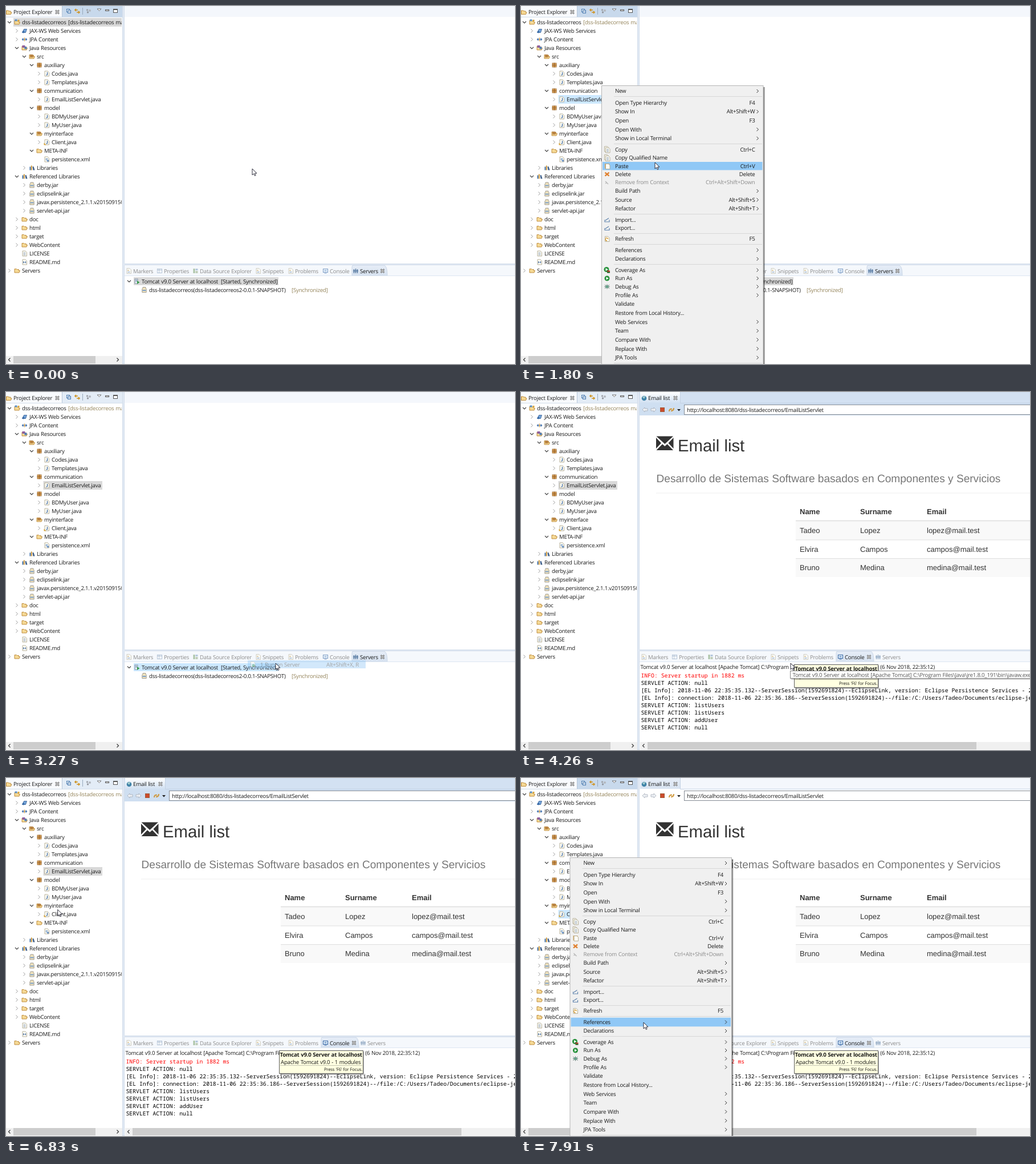
An HTML page for the animation above (7.99 s loop, 893x627 px).

```html
<!DOCTYPE html>
<html lang="en">
<head>
<meta charset="utf-8">
<title>Servlet demo</title>
<style>
html,body{margin:0;width:100%;height:100%;overflow:hidden;background:#fff}
svg{display:block;width:100vw;height:100vh}
text{font:9.7px "Open Sans","Noto Sans",sans-serif;letter-spacing:-.026em;word-spacing:.05em;fill:#1b1b1b;white-space:pre;text-rendering:geometricPrecision}
.b{font-weight:700}
.tan{fill:#94845a}
.dim{fill:#8c8c8c}
.tip{fill:#575757}
.tiny{font-size:7.7px}
.mono{font:9.77px "Noto Sans Mono","DejaVu Sans Mono",monospace;letter-spacing:0;word-spacing:0;fill:#000}
.err{fill:#f00}
.web{font:13px "Liberation Sans",Arial,sans-serif;letter-spacing:0;word-spacing:0;fill:#333}
.th{font-weight:700}
.h{font-size:29.3px}
.lead{font-size:19.1px;fill:#777}
.end{text-anchor:end}
</style>
</head>
<body>
<svg id="stage" viewBox="0 0 893 627" preserveAspectRatio="none"></svg>
<script>
const LOOP = 7990;
const rect = (x, y, w, h, fill, extra = '') => `<rect x="${x}" y="${y}" width="${w}" height="${h}" fill="${fill}" ${extra}/>`;
const line = (d, color, w = 1) => `<path d="${d}" fill="none" stroke="${color}" stroke-width="${w}"/>`;
const shape = (d, fill, extra = '') => `<path d="${d}" fill="${fill}" ${extra}/>`;
const dot = (x, y, r, fill) => `<circle cx="${x}" cy="${y}" r="${r}" fill="${fill}"/>`;
const text = (x, y, s, cls = '') => `<text x="${x}" y="${y}" class="${cls}">${s}</text>`;
const group = (id, body) => `<g id="${id}">${body}</g>`;
const at = (x, y, body) => `<g transform="translate(${x} ${y})">${body}</g>`;
const box = (x, y, w, h, fill, stroke) => rect(x + .5, y + .5, w - 1, h - 1, fill, `stroke="${stroke}"`);
const fade = (id, top, bottom) => `<linearGradient id="${id}" x2="0" y2="1"><stop stop-color="${top}"/><stop offset="1" stop-color="${bottom}"/></linearGradient>`;
const shadow = (x, y, w, h) => rect(x, y, w, h, '#000', 'opacity=".22"') + rect(x, y, w - 1, h - 1, '#000', 'opacity=".35"');
const cross = (x, y) => at(x, y, line('M-3-3 3 3M3-3-3 3', '#6f6f6f', 2.6) + line('M-2.6-2.6 2.6 2.6M2.6-2.6-2.6 2.6', '#fff', 1));
const right = (x, y, color = '#9a9a9a') => line(`M${x - 1.5} ${y - 3}l3 3-3 3`, color);
const down = (x, y) => line(`M${x - 3} ${y - 1.5}l3 3 3-3`, '#404040', 1.1);

// Small icons, drawn around their centre
const page = shape('M-3.5-4.5H1.5L4-2V4.5H-3.5Z', '#fdfdf6', 'stroke="#a89f85" stroke-width=".8"');
const folder = shape('M-4.5 3.5V-3H-1L0-2H3V0H5L3.5 3.5Z', '#f5d995', 'stroke="#b98432" stroke-width=".9"');
const blocks = rect(-3.5, -3.5, 7, 7, '#d9a25a', 'stroke="#9a6427" stroke-width=".8"') + line('M-4 0H4M0-4V4', '#8a5520', .9);
const books = rect(-4, -2, 2, 6, '#3f6fa8') + rect(-1.7, -4, 2, 8, '#d09a3d') + shape('M1-2 3-2.5 5 4H2Z', '#3f5f88');
const jay = line('M1-2.5V1.2Q1 2.6-1 2.4', '#35609c', 1.2);
const icons = {
  project: folder + rect(-4, -5, 4, 3, '#5b8fc7') + rect(1, -4.5, 3, 3, '#d8a53c'),
  service: shape('M-4 3L-1-3H4L2 3Z', '#76a5da', 'stroke="#2b568f" stroke-width=".8"') + dot(-2, 2, 2, '#3a6ca8'),
  jpa: line('M-4 0H4M-2-2-4 0-2 2M2-2 4 0 2 2', '#3d6fae', 1.2) + rect(-.7, -3, 1.4, 6, '#d39a3c'),
  res: folder + rect(-4, -4.5, 5, 4, '#8f5fa0') + rect(0, -2, 4, 4, '#4f7fb9'),
  src: folder + at(-.5, -1, `<g transform="scale(.65)">${blocks}</g>`),
  pack: blocks,
  java: page + jay,
  run: page + jay + shape('M-5 1V5H-1Z', '#d8a53c'),
  folder: folder,
  xml: page + line('M-2-1H2M-2 1H1', '#5883b5') + dot(2, 2.5, 1.8, '#6b94c7'),
  books: books,
  jar: shape('M-2.5-4.5H2.5V-3L3.7-1.5V4.5H-3.7V-1.5L-2.5-3Z', '#f1e3bd', 'stroke="#8d8a80" stroke-width=".8"') + rect(-3, 0, 6, 2, '#7ba0ca'),
  file: page + line('M-2-1.5H2M-2 .5H2M-2 2.5H2', '#7e93ad', .8),
  md: page + line('M-2 2V-1L0 1 2-1V2', '#44699b', 1),
  server: rect(-4, -4, 5, 8, '#eef2f7', 'stroke="#6d7f96" stroke-width=".8"') + line('M-3-2H0M-3 0H0', '#55769d', .9) + shape('M0-1 4.5 2 0 5Z', '#379a4a'),
  servers: line('M-3-3V4M0-4V4M3-3V4M-4.5 0H4.5', '#5578a0', 1.5),
  console: rect(-4, -3.5, 8, 6, '#eaf2fb', 'stroke="#3c6ca8" stroke-width="1.1"') + rect(-2, -1.5, 4, 2, '#6d9acb') + line('M-2 4H2', '#3c6ca8'),
  table: rect(-4, -3.5, 8, 7, '#fff', 'stroke="#6f8db0" stroke-width=".8"') + line('M-4-1.5H4M-1-3.5V3.5', '#6f8db0', .8),
  marks: page + rect(-2, -2, 2, 2, '#c69a4d') + rect(-2, 1, 4, 2, '#8fa8c7'),
  data: rect(-4, -4, 3, 8, '#7aa26f') + rect(0, -4, 4, 3, '#89a7c7') + rect(0, 0, 4, 4, '#9cb18c')
};
const icon = (kind, x, y) => at(x, y, icons[kind]);

// depth, state (v open, > closed, - leaf), icon, label
const tree = `0 v project dss-listadecorreos
1 > service JAX-WS Web Services
1 > jpa JPA Content
1 v res Java Resources
2 v src src
3 v pack auxiliary
4 > java Codes.java
4 > java Templates.java
3 v pack communication
4 > java EmailListServlet.java
3 v pack model
4 > java BDMyUser.java
4 > java MyUser.java
3 v src myinterface
4 > run Client.java
3 v folder META-INF
4 - xml persistence.xml
2 > books Libraries
1 v books Referenced Libraries
2 > jar derby.jar
2 > jar eclipselink.jar
2 > jar javax.persistence_2.1.1.v201509150
2 > jar servlet-api.jar
1 > folder doc
1 > folder html
1 > folder target
1 > folder WebContent
1 - file LICENSE
1 - md README.md
0 > folder Servers`.split('\n').map((row, i) => {
  const [, depth, state, kind, label] = row.match(/(\d) (\S) (\S+) (.*)/);
  const x = 28 + 13 * depth, y = 28.5 + 15 * i;
  const twisty = state === 'v' ? down(x - 22, y) : state === '>' ? right(x - 22, y) : '';
  return twisty + icon(kind, x - 8.5, y) + text(x, y + 3.5, label);
}).join('');

const scroll = (x, end, thumbEnd) => rect(x, 613, end - x, 13, '#f0f0f0') + rect(x + 13, 613, thumbEnd - x - 13, 13, '#cdcdcd')
  + line(`M${x + 7.5} 616.5l-3 3 3 3`, '#404040', 1.3) + line(`M${end - 9.5} 616.5l3 3-3 3`, '#404040', 1.3);

const explorer = rect(0, 0, 204, 627, '#fff')
  + group('strip', rect(98, 0, 106, 19, '#c8d9ec')) + rect(0, 0, 98, 19, '#f8fafd') + line('M98.5 0V19', '#b7c6d9')
  + line('M0 19.5H204', '#d3deeb') + icon('folder', 5, 11) + text(13, 14, 'Project Explorer') + cross(90, 10.5)
  + box(106, 5, 6, 6, '#fff', '#4779b0') + box(108, 7, 6, 6, '#fff', '#4779b0') + line('M109 10H113', '#4779b0')
  + line('M121 7H126M123 5 121 7 123 9M129 11H124M127 9 129 11 127 13', '#cf9424', 1.7)
  + line('M134.5 3V15', '#98a9bd') + dot(142.5, 7, 1.7, '#a2a6ad') + dot(147, 8, 2, '#b3b7be') + dot(143.5, 11, 1.7, '#9599a1')
  + shape('M160 5H167L163.5 8.5Z', '#fff', 'stroke="#555" stroke-width=".8"')
  + box(174, 6, 7, 3, '#fff', '#555') + box(188, 5, 8, 7, '#fff', '#555') + line('M188 6.5H196', '#555')
  + '<rect id="sel"/>' + tree
  + group('tagDark', text(109, 32, '[dss-listadecorreos master]')) + group('tagTan', text(109, 32, '[dss-listadecorreos master]', 'tan'))
  + rect(203, 20, 1, 593, '#fff') + scroll(0, 204, 157);

const frame = rect(204, 0, 689, 627, '#e1e9f4') + line('M204.5 0V627', '#d3ddea')
  + rect(208, 0, 685, 451, '#fff') + rect(208, 0, 685, 19, '#f4f7fc')
  + rect(208, 454, 685, 173, '#fff') + rect(208, 454, 685, 18, '#f5f8fc') + line('M207.5 0V451M208 451.5H893M207.5 454V627M208 453.5H893', '#d3ddea');

const browserTab = group('webOn', rect(208, 0, 685, 19, '#d3e1f2') + rect(208, 19, 685, 22, '#cfdff1') + rect(209, 0, 70, 20, 'url(#tabOn)'))
  + group('webOff', rect(208, 0, 685, 19, '#f4f7fc') + rect(208, 19, 685, 22, '#fff') + rect(209, 0, 70, 19, 'url(#tabOff)'))
  + line('M279.5 0V19.5H893', '#c3d1e3') + dot(216, 11, 4.3, '#3f83a8') + shape('M213 9Q216 6 218 8L216 12Z', '#a7d0cf')
  + text(223, 14, 'Email list') + cross(271, 10.5)
  + shape('M213 31l4-4v2h5v4h-5v2Z', '#edf0f4', 'stroke="#a5adb8" stroke-width=".8"')
  + shape('M237 31l-4-4v2h-5v4h5v2Z', '#edf0f4', 'stroke="#a5adb8" stroke-width=".8"')
  + rect(244.5, 27.5, 7, 7, '#cc4b2c', 'stroke="#a05c37"')
  + line('M260 34Q260 29 265 30M268 28Q268 33 263 33', '#cf9638', 2) + shape('M274 30H280L277 33.5Z', '#222')
  + rect(286.5, 22.5, 610, 17, '#fff', 'stroke="#858b94"')
  + text(291, 34.5, 'http://localhost:8080/dss-listadecorreos/EmailListServlet') + rect(208, 41, 685, 410, '#fff');

const people = [['Tadeo', 'Lopez'], ['Elvira', 'Campos'], ['Bruno', 'Medina']];
const cells = (y, row, cls) => [489, 595, 712].map((x, i) => text(x, y, row[i], cls)).join('');
const webPage = shape('M237.5 77.5H267L252.3 91Z', '#333') + shape('M237 80 246 89.5 237 99ZM267.5 80V99L258.5 89.5ZM248 91.3 252.3 95 256.6 91.3 267 102H237.5Z', '#333')
  + text(275, 103.6, 'Email list', 'web h') + text(237.5, 158, 'Desarrollo de Sistemas Software basados en Componentes y Servicios', 'web lead')
  + line('M237 177H893', '#eee') + cells(213.7, ['Name', 'Surname', 'Email'], 'web th')
  + people.map(([name, last], i) => {
    const y = 226 + 32.7 * i;
    return rect(482, y, 411, 32.7, i % 2 ? '#fff' : '#f9f9f9') + line(`M482 ${y + (i ? .3 : -.5)}H893`, '#ddd', i ? 1 : 1.7)
      + cells(247 + 32.6 * i, [name, last, last.toLowerCase() + '@mail.test'], 'web');
  }).join('');

const tabList = [['marks', 'Markers', 223], ['table', 'Properties', 277], ['data', 'Data Source Explorer', 340], ['marks', 'Snippets', 450],
  ['marks', 'Problems', 507], ['console', 'Console', 568], ['servers', 'Servers', 621]];
const tabs = (active, x0, x1) => shape(`M${x0} 472V457Q${x0} 454 ${x0 + 3} 454H${x1 - 6}Q${x1} 455 ${x1} 472Z`, 'url(#tabOff)', 'stroke="#ccd8e8"')
  + line('M208 472.5H893', '#dce6f2')
  + tabList.map(([kind, label, x]) => {
    const shift = active === 'Console' && label === 'Servers' ? 13 : 0, on = label === active;
    return `<g opacity="${on ? 1 : .6}">${icon(kind, x - 7.5 + shift, 464)}</g>` + text(x + shift, 467.7, label, on ? '' : 'dim');
  }).join('') + cross(x1 - 8.5, 464);

const title = 'Tomcat v9.0 Server at localhost';
const proc = title + ' [Apache Tomcat] C:\\Program Files\\Java\\jre1.8.0_191\\bin\\javaw.exe (6 Nov 2018, 22:35:12)';
const servers = tabs('Servers', 607, 669) + '<rect id="row" x="224" y="475" width="254" height="14"/>'
  + down(216, 482) + icon('server', 230, 482) + text(238, 485.5, title) + text(377, 485.5, '[Started, Synchronized]')
  + icon('jar', 242.5, 497) + text(251, 500.5, 'dss-listadecorreos(dss-listadecorreos2-0.0.1-SNAPSHOT)') + text(501, 500.5, '[Synchronized]', 'tan');
const log = ['INFO: Server startup in 1882 ms', 'SERVLET ACTION: null',
  '[EL Info]: 2018-11-06 22:35:35.132--ServerSession(1592691824)--EclipseLink, version: Eclipse Persistence Services - 2.6.1',
  '[EL Info]: connection: 2018-11-06 22:35:36.186--ServerSession(1592691824)--/file:/C:/Users/Tadeo/Documents/eclipse-jee',
  'SERVLET ACTION: listUsers', 'SERVLET ACTION: listUsers', 'SERVLET ACTION: addUser', 'SERVLET ACTION: null'];
const consoleView = tabs('Console', 553, 619) + text(209.5, 485, proc)
  + log.map((s, i) => text(210.5, 499.5 + 13 * i, s, i ? 'mono' : 'mono err')).join('')
  + scroll(209, 907, 799);

const hint = rect(481, 479, 147, 41, '#000', 'opacity=".3"') + box(479, 477, 148, 41, '#ffffe1', '#5e5e5e')
  + text(480.5, 488, title, 'b') + text(482, 501.2, 'Apache Tomcat v9.0 - 1 modules')
  + line('M481 503.5H625', '#c6c6b4') + text(625, 512.5, "Press 'F6' for Focus.", 'tiny end');
const pathTip = rect(474, 490, 425, 14, '#000', 'opacity=".2"') + box(472, 488, 430, 14, '#fff', '#888') + text(476.5, 498.5, proc, 'tip');

// centre y, label, shortcut; a trailing > opens a submenu
const items = [[149, 'New>'], [169.3, 'Open Type Hierarchy', 'F4'], [185, 'Show In>', 'Alt+Shift+W'], [200.5, 'Open', 'F3'],
  [216.2, 'Open With>'], [231.8, 'Show in Local Terminal>'], [251.5, 'Copy', 'Ctrl+C'], [266, 'Copy Qualified Name'],
  [280.2, 'Paste', 'Ctrl+V'], [294.6, 'Delete', 'Delete'], [309, 'Remove from Context', 'Ctrl+Alt+Shift+Down'],
  [324, 'Build Path>'], [339.5, 'Source>', 'Alt+Shift+S'], [355, 'Refactor>', 'Alt+Shift+T'], [374.5, 'Import...'],
  [389, 'Export...'], [408, 'Refresh', 'F5'], [427.5, 'References>'], [443, 'Declarations>'], [462.5, 'Coverage As>'],
  [477, 'Run As>'], [491.5, 'Debug As>'], [506.5, 'Profile As>'], [522, 'Validate'], [537.6, 'Restore from Local History...'],
  [553.2, 'Web Services>'], [568.9, 'Team>'], [584.5, 'Compare With>'], [600.2, 'Replace With>'], [615.8, 'JPA Tools>']];
const glyph = (y, body) => at(10, y, body);
const play = dot(0, 0, 4.5, '#27913b') + shape('M-1.5-2.5 2.8 0-1.5 2.5Z', '#fff');
const arrowTray = line('M-4 0V3.5H4V0M-3 1 3-3', '#5f83ad', 1.2);
const menuIcons = glyph(251.5, at(-1, -1, page) + at(1, 1, icons.file)) + glyph(266, at(-1, -1, page) + at(1, 1, icons.file))
  + glyph(280, rect(-4, -4, 8, 8.5, '#d4a862') + at(1, 1, page)) + glyph(294.6, line('M-3.5-3 3.5 3M3.5-3-3.5 3', '#e0812f', 2.4))
  + glyph(309, line('M-3-2 2 3M-3 2 0 0', '#b9b9b9', 1.5)) + glyph(374.5, arrowTray) + glyph(389, arrowTray)
  + glyph(408, page + line('M-3-1Q0-3 2 0M0 3Q-3 3-3 0', '#d49a35', 1.4))
  + glyph(462.5, at(-1, -1, play) + rect(0, 1, 5, 2, '#c22') + rect(0, 3, 5, 2, '#151')) + glyph(477, play)
  + glyph(491.5, line('M-4-3 4 3M4-3-4 3M-4.5 0H4.5M0-4V4', '#49635c', .9) + dot(0, 0, 2.5, '#67a18b'));
const menu = shadow(3, 142, 284, 490) + box(0, 139, 284.5, 495, '#f0f0f0', '#b5b5b5')
  + '<rect id="hot" x="2" width="280.5" fill="#90c8f6"/>'
  + [158.5, 241.5, 364.5, 398.5, 417.5, 452.5, 625.5].map(y => line(`M22 ${y}H282`, '#d7d7d7')).join('')
  + items.map(([y, label, key = '']) => {
    const cls = y === 309 ? 'dim' : '';
    return text(24, y + 3.4, label.replace('>', ''), cls) + text(269.5, y + 3.4, key, 'end ' + cls) + (label.endsWith('>') ? right(274, y, '#333') : '');
  }).join('') + menuIcons;

const runItem = rect(424, 470, 207, 14, '#90c8f6', 'id="runHot"') + at(433, 477, page + dot(1, 2, 2.4, '#3c9a4b'))
  + text(446, 480.5, '1 Run on Server') + text(619, 480.5, 'Alt+Shift+X, R', 'end');
const subMenu = shadow(425, 471, 211, 39) + box(422, 468, 211, 39, '#f0f0f0', '#b5b5b5')
  + line('M444 488.5H631', '#d7d7d7') + text(446, 500.5, 'Run Configurations...');

const stage = document.getElementById('stage');
stage.innerHTML = `<defs>${fade('tabOn', '#fff', '#cfdff1')}${fade('tabOff', '#e6edf7', '#d8e3f1')}</defs>`
  + explorer + frame + group('web', browserTab) + group('page', webPage)
  + group('servers', servers) + group('console', consoleView) + group('hint', hint) + group('pathTip', pathTip)
  + group('menu', menu) + group('sub', subMenu) + group('runItem', runItem)
  + group('pointer', '<circle id="press" r="10" fill="#ff0" opacity=".47"/>'
    + shape('M0 0V11L2.6 8.7 4.4 12.4 6.1 11.6 4.4 8H8Z', '#fff', 'stroke="#1a1a2a" stroke-width=".9" stroke-linejoin="round"'));

const el = {};
stage.querySelectorAll('[id]').forEach(n => el[n.id] = n);
const show = (id, on) => { el[id].style.display = on ? '' : 'none'; };
const set = (node, attrs) => { for (const k in attrs) node.setAttribute(k, attrs[k]); };

// Pointer moves: first step, last step, destination
const moves = [[560, 1340, 141, 160], [1650, 1800, 235, 274], [1880, 2260, 262, 478], [2490, 3110, 473, 475],
  [4430, 4730, 331, 118], [5740, 5740, 330, 124], [6120, 6900, 85, 233],
  [7140, 7450, 155, 265], [7530, 7760, 190, 373], [7840, 7910, 215, 428]];
function pointerAt(t) {
  let x = 432, y = 285;
  for (const [from, to, tx, ty] of moves) {
    if (t < from) break;
    const n = Math.round((to - from) / 77) + 1, step = (to - from) / (n - 1) || 1;
    const p = Math.min(1, (Math.floor((t - from) / step + 1e-6) + 1) / n), e = p * p * (3 - 2 * p);
    x += (tx - x) * e;
    y += (ty - y) * e;
  }
  return [x, y];
}

function draw(t) {
  const between = (a, b) => t >= a && t < b;
  const [x, y] = pointerAt(t);
  const blue = '#cce8ff', grey = '#d9d9d9';
  set(el.pointer, { transform: `translate(${x} ${y})` });
  show('press', between(1340, 1420) || between(3110, 3190) || between(6900, 6990));

  const [sx, sy, sw, fill] = t < 1340 ? [13, 21, 191, grey] : t < 3190 ? [65.5, 156, 103.5, blue]
    : t < 6900 ? [65.5, 156, 103.5, grey] : [65.5, 231, 61, blue];
  set(el.sel, { x: sx, y: sy, width: sw, height: 15, fill });
  show('tagDark', t < 1340);
  show('tagTan', t >= 1340);
  set(el.strip.firstChild, { fill: between(3190, 6990) ? '#e3ecf6' : '#c8d9ec' });
  set(el.row, { fill: t < 3190 ? grey : blue });

  show('web', t >= 3430);
  show('webOn', t < 6990);
  show('webOff', t >= 6990);
  show('page', t >= 3660);
  show('servers', t < 3510);
  show('console', t >= 3510);
  show('hint', t >= 3950);
  show('pathTip', between(4120, 4500));

  const inSub = between(2570, 3190) && x > 422;
  show('menu', between(1650, 3190) || t >= 7070);
  set(el.menu, { transform: `translate(${t < 5000 ? 141 : 85.5} 0)` });
  const hot = inSub ? items[20] : items.find(i => Math.abs(y - i[0]) < 7.5);
  show('hot', hot);
  if (hot) {
    const half = hot[1].endsWith('>') ? 7.8 : 7.2;
    set(el.hot, { y: hot[0] - half, height: 2 * half });
  }
  show('sub', between(2570, 3190));
  show('runItem', between(2570, 3350));
  show('runHot', inSub || t >= 3190);
  set(el.runItem, { opacity: t < 3190 ? 1 : t < 3270 ? .65 : .4 });
}

const start = performance.now();
function tick() {
  draw((performance.now() - start) % LOOP);
  requestAnimationFrame(tick);
}
tick();
</script>
</body>
</html>
```
